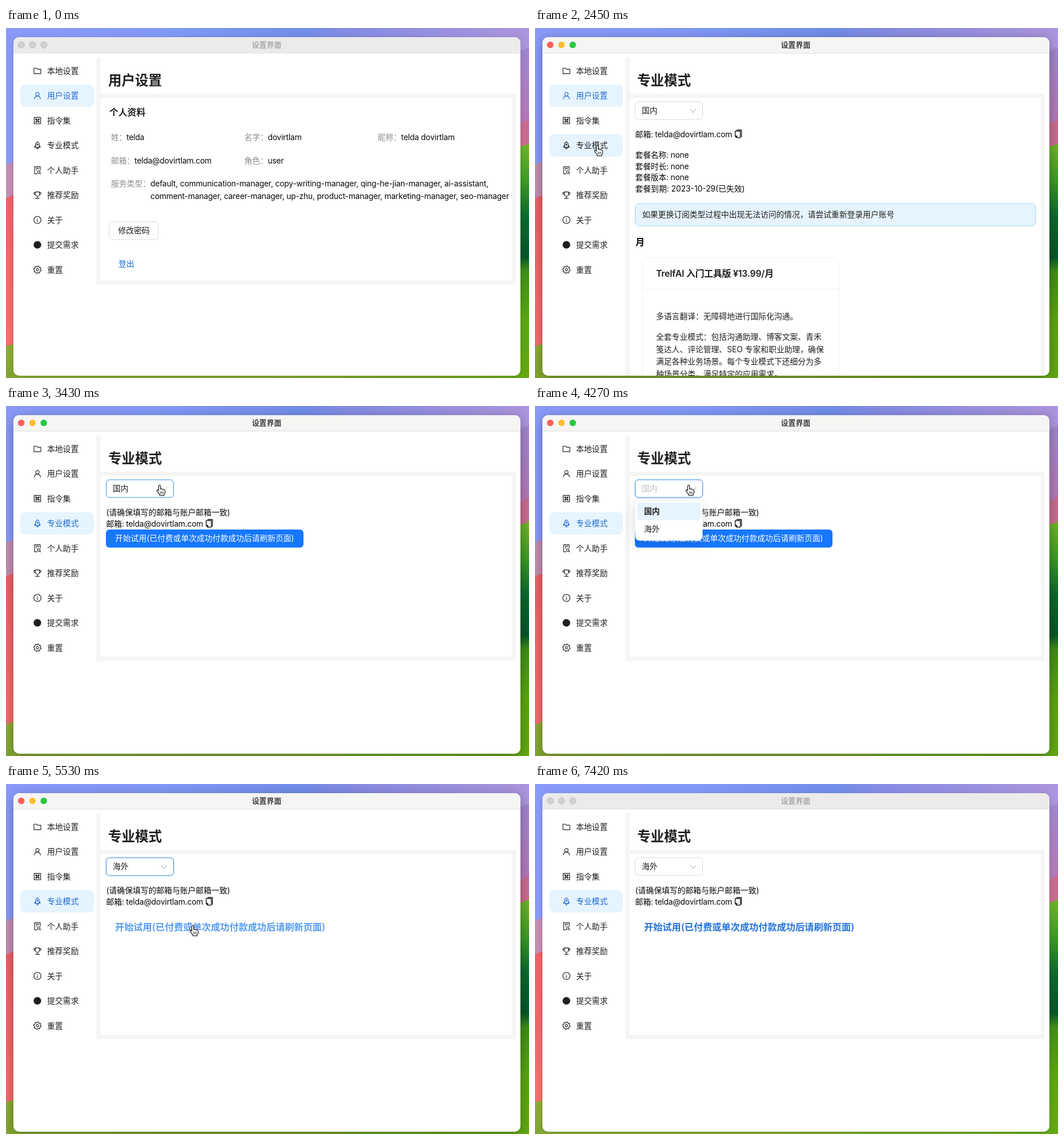
Animation of 916x612 px, one loop 7840 ms. Source, as an HTML page with a canvas:

```html
<!DOCTYPE html>
<html lang="zh-CN">
<head>
<meta charset="utf-8">
<title>设置界面</title>
<style>
html, body { margin: 0; width: 100%; height: 100%; overflow: hidden; }
canvas { display: block; }
</style>
</head>
<body>
<canvas id="stage" width="916" height="612"></canvas>
<script>
const ctx = document.getElementById('stage').getContext('2d');
const W = 916, H = 612, LOOP = 7840, STEP = 70;
const INK = '#1f1f1f', BLACK = '#080808', GREY = '#8c8c8c', BLUE = '#1f6bd0', PALE = '#e6f4ff';
const BORDER = '#d9d9d9', PANEL = '#f5f5f4';
const FONT = 'Inter, "Noto Sans CJK SC", "Noto Sans CJK", sans-serif';
const EMAIL = 'telda@dovirtlam.com';
const TRIAL = '开始试用(已付费或单次成功付款成功后请刷新页面)';
const MENU = ['本地设置', '用户设置', '指令集', '专业模式', '个人助手', '推荐奖励', '关于', '提交需求', '重置'];

// Moments of the story, in ms
const FOCUS = 1680, HAND = 1960, PAGE = 2380, TRIAL_IN = 2590, HOVER = 3150,
  OPEN = 4060, PICK = 4900, LINK_ON = 5320, BLUR = 6090, LEAVE = 6860;

// Pointer path: time, x, y
const PATH = [
  [70, 432, 600], [280, 282, 295], [420, 282, 295], [770, 238, 268], [910, 238, 268],
  [1610, 109, 206], [2520, 109, 206], [2800, 235, 191], [3150, 264, 142], [3430, 269, 139],
  [4340, 269, 139], [4760, 222, 211], [4970, 222, 211], [5530, 327, 248], [LEAVE, 327, 248],
  [7420, 430, 613]
];
const SHAPES = [
  [0, 'arrow'], [HAND, 'hand'], [2660, 'beam'], [HOVER, 'hand'],
  [5040, 'arrow'], [LINK_ON, 'hand'], [6930, 'arrow']
];

const clamp = v => Math.max(0, Math.min(1, v));
const ramp = (t, a, b) => clamp((t - a) / (b - a));
const ease = k => k * k * (3 - 2 * k);

function mix(a, b, k) {
  const part = (c, i) => parseInt(c.substr(1 + 2 * i, 2), 16);
  return 'rgb(' + [0, 1, 2].map(i => Math.round(part(a, i) + (part(b, i) - part(a, i)) * k)) + ')';
}

function text(s, x, y, color = INK, size = 13.8, weight = 400, align = 'left') {
  ctx.font = `${weight} ${size}px ${FONT}`;
  ctx.letterSpacing = /[a-z]{3}/.test(s) ? '-0.17px' : '0px';
  ctx.textAlign = align;
  ctx.fillStyle = color;
  ctx.fillText(s, x, y + size * 0.36);
}

function rect(x, y, x2, y2, color) {
  ctx.fillStyle = color;
  ctx.fillRect(x, y, x2 - x, y2 - y);
}

function box(x, y, x2, y2, r, fill, line) {
  ctx.beginPath();
  ctx.roundRect(x, y, x2 - x, y2 - y, r);
  if (fill) { ctx.fillStyle = fill; ctx.fill(); }
  if (line) { ctx.strokeStyle = line; ctx.lineWidth = 1; ctx.stroke(); }
}

function dot(x, y, r, fill, line) {
  ctx.beginPath();
  ctx.arc(x, y, r, 0, 2 * Math.PI);
  ctx.fillStyle = fill;
  ctx.fill();
  if (line) { ctx.strokeStyle = line; ctx.lineWidth = 1; ctx.stroke(); }
}

function strokePath(d, x, y, color, width = 1.15) {
  ctx.save();
  ctx.translate(x, y);
  ctx.strokeStyle = color;
  ctx.lineWidth = width;
  ctx.lineJoin = ctx.lineCap = 'round';
  ctx.stroke(new Path2D(d));
  ctx.restore();
}

function shadow(color, blur, dy) {
  ctx.shadowColor = color;
  ctx.shadowBlur = blur;
  ctx.shadowOffsetY = dy;
}

function fade(x0, y0, x1, y1, stops) {
  const g = ctx.createLinearGradient(x0, y0, x1, y1);
  stops.forEach(([p, c]) => g.addColorStop(p, c));
  return g;
}

// A band of wallpaper with slanted upper edge
function band(x, x2, yL, yR, fill) {
  ctx.beginPath();
  ctx.moveTo(x, yL);
  ctx.lineTo(x2, yR);
  ctx.lineTo(x2, H);
  ctx.lineTo(x, H);
  ctx.fillStyle = fill;
  ctx.fill();
}

function wallpaper() {
  rect(0, 0, W, H, fade(0, 0, W, 0, [
    [0, '#8a9afa'], [0.3, '#8299f8'], [0.57, '#728eea'], [0.65, '#858ce4'], [1, '#ac95dd']]));
  band(0, 16, 240, 231, '#c48db2');
  band(0, 16, 298, 291, fade(0, 295, 0, 555, [[0, '#ee6068'], [1, '#f56f6c']]));
  band(0, 16, 557, 551, fade(0, 555, 0, H, [[0, '#8eab34'], [1, '#80a630']]));
  band(896, W, 42, 34, fade(0, 40, 0, 170, [[0, '#a086cd'], [1, '#b576b6']]));
  band(896, W, 172, 158, '#c86c8e');
  band(896, W, 210, 202, fade(0, 205, 0, H, [
    [0, '#6cb42a'], [0.15, '#3f9a25'], [0.3, '#0d6a2c'], [0.48, '#075428'],
    [0.54, '#3f8d18'], [0.75, '#5aa50f'], [1, '#62a812']]));
  rect(10, 606, 905, H, fade(0, 0, W, 0, [[0, '#86a932'], [0.5, '#80a730'], [1, '#66a81a']]));
}

function gear() {
  let d = '';
  for (let i = 0; i <= 32; i++) {
    const a = (i + 0.5) * Math.PI / 16, r = i % 4 < 2 ? 6.6 : 5.2;
    d += (i ? 'L' : 'M') + (r * Math.cos(a)).toFixed(2) + ' ' + (r * Math.sin(a)).toFixed(2);
  }
  return d + 'M2.1 0A2.1 2.1 0 1 1 2.1 -.1';
}

const ICONS = [
  'M-6-4.8H-1.6L.2-2.9H6V4.8H-6Z',
  'M3.1-2.6A3.1 3.1 0 1 1 3.1-2.7M-5.3 5.8C-4.9-1 4.9-1 5.3 5.8',
  'M-5.6-5.6H5.6V5.6H-5.6ZM-1.3-1.3H1.3V1.3H-1.3ZM-1.3-1.3H-2.3A1 1 0 1 1-1.3-2.3ZM1.3-1.3V-2.3A1 1 0 1 1 2.3-1.3ZM1.3 1.3H2.3A1 1 0 1 1 1.3 2.3ZM-1.3 1.3V2.3A1 1 0 1 1-2.3 1.3Z',
  'M0-6.3Q3.3-4.4 3.3-1V3.2H-3.3V-1Q-3.3-4.4 0-6.3ZM-3.3.4L-4.8 1.6V3.2H4.8V1.6L3.3.4M-1.4 3.6Q-1.6 5.6 0 6.3Q1.6 5.6 1.4 3.6M1.1-1.4A1.1 1.1 0 1 1 1.1-1.5',
  'M-.8 6H-5V-6.2H5V-.2M-2.6-3.4H2.6M-2.6-.8H-.4M4.6 3.2A2.2 2.2 0 1 1 4.6 3.1M4 4.7L5.6 6.3',
  'M-3.6-5.6H3.6V-1.6A3.6 3.6 0 0 1-3.6-1.6ZM-3.6-4.4H-6V-2.6Q-5.6-.8-3.4-.8M3.6-4.4H6V-2.6Q5.6-.8 3.4-.8M0 2V5.4M-3.4 5.6H3.4',
  'M6.3 0A6.3 6.3 0 1 1 6.3-.1M0-.8V3.2M0-3.1V-2.9',
  null,
  gear()
];

function sidebar(t) {
  const k = ramp(t, 2450, 2730);
  MENU.forEach((label, i) => {
    const y = 75 + 43.45 * i;
    const on = i === 1 ? 1 - k : i === 3 ? k : 0;
    const back = i === 3 && t >= PAGE ? 1 : on;
    if (back) box(25, y - 19.5, 154, y + 19.5, 8, mix('#ffffff', PALE, back));
    const color = mix(INK, BLUE, on);
    if (ICONS[i]) strokePath(ICONS[i], 55, y, color);
    else dot(55, y, 6.6, color);
    text(label, 72, y, color);
  });
}

function panel(title, bottom) {
  rect(158, 51, 893, bottom, PANEL);
  rect(166, 51, 893, 115, '#fff');
  rect(166, 122, 886, bottom - 8, '#fff');
  text(title, 179, 91.5, INK, 23.5, 600);
}

function userPage() {
  panel('用户设置', 449);
  text('个人资料', 181, 147, INK, 15.8, 600);
  const field = (label, value, x, gap, y) => {
    text(label + '：', x, y, GREY);
    text(value, x + gap, y, BLACK);
  };
  field('姓', 'telda', 184, 27, 191.5);
  field('名字', 'dovirtlam', 417.5, 41, 191.5);
  field('昵称', 'telda dovirtlam', 651, 41, 191.5);
  field('邮箱', EMAIL, 184, 41, 232);
  field('角色', 'user', 417.5, 41, 232);
  field('服务类型', 'default, communication-manager, copy-writing-manager, qing-he-jian-manager, ai-assistant,', 184, 69, 272.5);
  text('comment-manager, career-manager, up-zhu, product-manager, marketing-manager, seo-manager', 253, 294.5, BLACK);
  box(181, 339, 267, 370, 6, '#fff', BORDER);
  text('修改密码', 224, 354.5, INK, 13.8, 400, 'center');
  text('登出', 197, 412, BLUE);
}

function select(t) {
  const hover = ramp(t, HOVER, 3430) * (t < BLUR ? 1 : 0);
  const focused = t >= OPEN && t < BLUR;
  if (focused) box(173.5, 127, 295.5, 162, 8, '#e6f3ff');
  box(175.5, 129, 293.5, 160, 6, '#fff', mix(BORDER, '#3f8be8', hover));
  const open = t >= OPEN && t < PICK;
  text(t < PICK ? '国内' : '海外', 187, 144.5, open ? '#bfbfbf' : INK);
  strokePath('M-4.6-2.8L0 2.8L4.6-2.8', 277, 145, '#bdbdbd', 1.1);
}

function emailLine(y) {
  text('邮箱: ' + EMAIL, 175.5, y, BLACK);
  strokePath('M-2.8-6.5H5.6V5.6M-5.4-4.6H3.6V6.8H-2.6L-5.4 4.2ZM-5.2 4H-2.4V6.6', 356, y - 1, BLACK, 1.3);
}

function planPage(t) {
  panel('专业模式', 640);
  select(t);
  emailLine(186);
  ['套餐名称: none', '套餐时长: none', '套餐版本: none', '套餐到期: 2023-10-29(已失效)']
    .forEach((s, i) => text(s, 175.5, 222 + 19.7 * i, BLACK));
  box(175.5, 307, 877, 346, 8, PALE, '#a3d0ec');
  text('如果更换订阅类型过程中出现无法访问的情况，请尝试重新登录用户账号', 188, 326.5);
  text('月', 176, 374, BLACK, 16, 600);
  box(188, 401.5, 532.5, 660, 8, '#fff', '#f0f0f0');
  rect(188, 456, 532, 457, '#f0f0f0');
  text('TrelfAI 入门工具版 ¥13.99/月', 212, 429.5, INK, 15.8, 600);
  text('多语言翻译：无障碍地进行国际化沟通。', 212, 504.5);
  ['全套专业模式：包括沟通助理、博客文案、青禾', '笺达人、评论管理、SEO 专家和职业助理，确保',
    '满足各种业务场景。每个专业模式下还细分为多', '种场景分类，满足特定的应用需求。']
    .forEach((s, i) => text(s, 212, 540 + 21.7 * i));
}

function dropdown(t) {
  const k = ramp(t, OPEN - STEP, 4270) * (1 - ramp(t, PICK - STEP, 5110));
  if (!k) return;
  ctx.save();
  ctx.globalAlpha = k;
  ctx.translate(0, 165);
  ctx.scale(1, 0.8 + 0.2 * k);
  ctx.translate(0, -165);
  shadow('rgba(0,0,0,.16)', 18, 5);
  box(175.5, 165, 293.5, 235.5, 8, '#fff');
  shadow('transparent', 0, 0);
  box(179, 169, 290, 199.5, 4, t < PICK ? PALE : '#fff');
  if (t >= 4620) box(179, 200, 290, 231, 4, t < PICK ? '#f5f5f5' : PALE);
  text('国内', 191, 184, INK, 13.8, t < PICK ? 600 : 400);
  text('海外', 191, 215.5, INK, 13.8, t < PICK ? 400 : 600);
  ctx.restore();
}

function trialPage(t) {
  panel('专业模式', 446);
  select(t);
  text('(请确保填写的邮箱与账户邮箱一致)', 175.5, 186, BLACK);
  emailLine(206);
  if (t < PICK) {
    box(175, 218, 521, 249, 6, '#e6f4ff');
    box(175, 216, 521, 247.5, 6, '#1677ff');
    text(TRIAL, 191, 231.5, '#fff');
  } else {
    const glow = ramp(t, LINK_ON, 5530) * (1 - ramp(t, LEAVE, 7140));
    text(TRIAL, 191, 250.5, mix('#2273dc', '#559cf0', glow), 16.2, 600);
  }
  dropdown(t);
}

function windowFrame(t) {
  const focus = t >= FOCUS && t < BLUR;
  ctx.save();
  shadow(focus ? 'rgba(0,0,0,.3)' : 'rgba(0,0,0,.16)', focus ? 20 : 9, focus ? 4 : 1);
  box(13, 16, 901, 608, 10, '#fff');
  ctx.restore();
  ctx.save();
  ctx.beginPath();
  ctx.roundRect(13, 16, 888, 592, 10);
  ctx.clip();
  rect(13, 16, 901, 44, focus ? '#f5f5f4' : '#ecebea');
  rect(13, 43.5, 901, 44.5, focus ? '#dededd' : '#e2e1e0');
  ['#fe5f57', '#febc2e', '#28c840'].forEach((c, i) =>
    dot(26.7 + 19.7 * i, 29.5, 5.7, focus ? c : '#d1d0cf', focus ? null : '#c0bfbe'));
  text('设置界面', 456.5, 29.5, focus ? '#3d3d3d' : '#aaa9a8', 12.9, 600, 'center');
  sidebar(t);
  if (t < PAGE) userPage();
  else if (t < TRIAL_IN) planPage(t);
  else trialPage(t);
  ctx.restore();
}

const ARROW = new Path2D('M0 0V13.5L3.1 10.6L5.2 15.6L7.4 14.7L5.3 9.8H9.4Z');
const PALM = new Path2D('M-1.6 9.5V1a1.6 1.6 0 0 1 3.2 0V6.2q2.6-.9 3.1.7q2.4-.6 2.8.9q2-.2 2 1.6v2.6q-.2 2.2-1.6 3.6v1.6h-7.6v-1.4q-2.6-2.6-4.6-6q-1-2 .6-2.3q1.1 0 2.1 1.6z');

function pointer(t) {
  if (t < PATH[0][0]) return;
  const i = PATH.findIndex(p => p[0] > t);
  if (i < 0) return;
  const [t0, x0, y0] = PATH[i - 1], [t1, x1, y1] = PATH[i];
  const k = ease(ramp(t, t0, t1));
  const shape = SHAPES.filter(s => s[0] <= t).pop()[1];
  const x = x0 + (x1 - x0) * k, y = y0 + (y1 - y0) * k;
  if (shape === 'beam') {
    const d = 'M-3-7.5Q0-7.5 0-5.5Q0-7.5 3-7.5M0-5.5V5.5M-3 7.5Q0 7.5 0 5.5Q0 7.5 3 7.5M-1.5 2.5H1.5';
    strokePath(d, x, y, 'rgba(255,255,255,.8)', 2.6);
    strokePath(d, x, y, '#111', 1.1);
    return;
  }
  ctx.save();
  ctx.translate(x, y);
  ctx.lineJoin = 'round';
  shadow('rgba(0,0,0,.3)', 2, 1);
  if (shape === 'arrow') {
    ctx.strokeStyle = '#fff';
    ctx.lineWidth = 2;
    ctx.stroke(ARROW);
    shadow('transparent', 0, 0);
    ctx.fillStyle = '#000';
    ctx.fill(ARROW);
  } else {
    ctx.fillStyle = '#fff';
    ctx.fill(PALM);
    shadow('transparent', 0, 0);
    ctx.strokeStyle = '#111';
    ctx.lineWidth = 1.1;
    ctx.stroke(PALM);
    strokePath('M1.6 10.8V14.2M3.9 10.8V14.2M6.2 10.8V14.2', 0, 0, '#111', 0.9);
  }
  ctx.restore();
}

function draw(t) {
  wallpaper();
  windowFrame(t);
  pointer(t);
}

const start = performance.now();
function tick() {
  const t = (performance.now() - start) % LOOP;
  draw(Math.floor(t / STEP) * STEP);
  requestAnimationFrame(tick);
}
tick();
</script>
</body>
</html>
```
